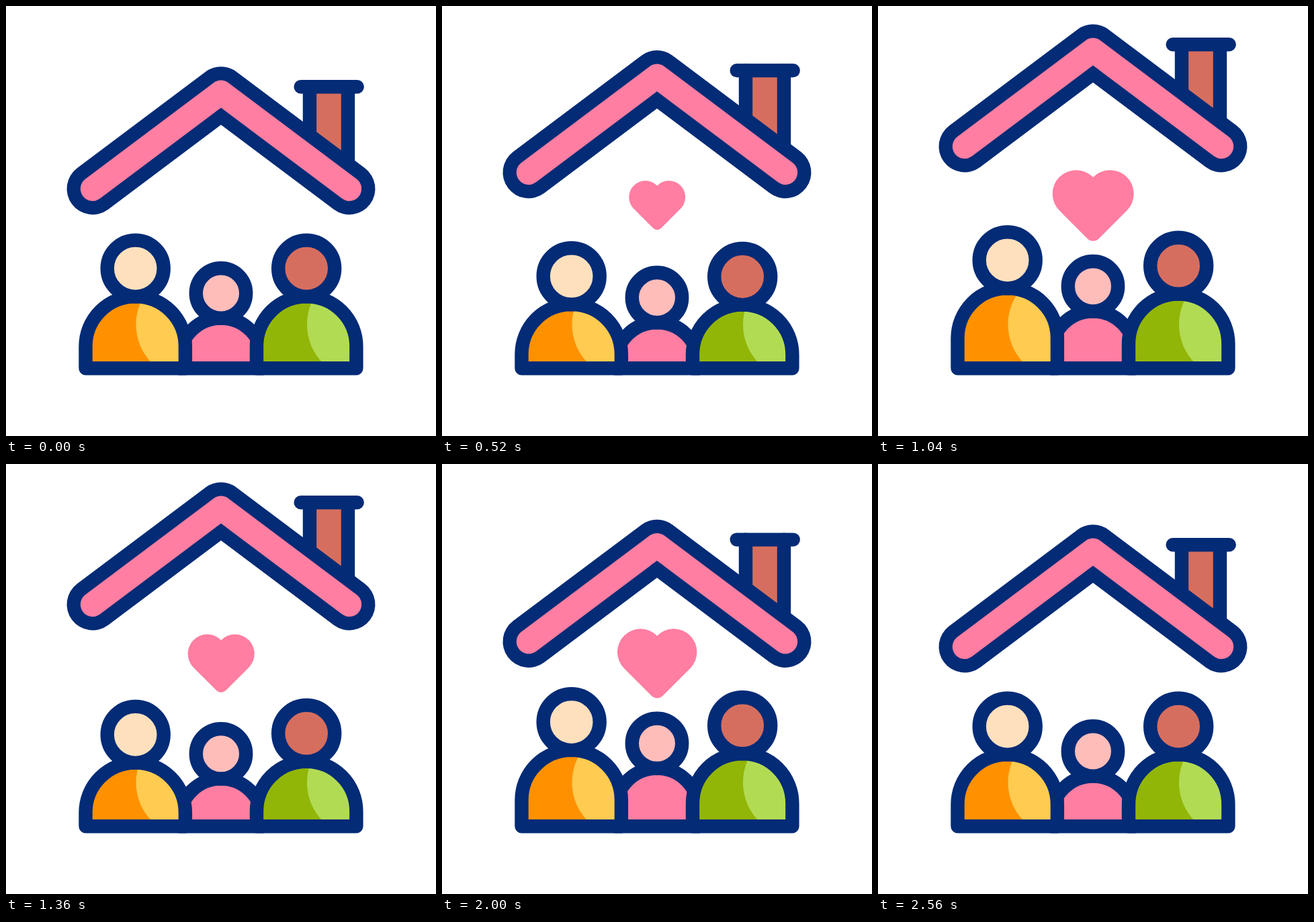
These frames come from a looping animation (640x640 px, 2640 ms). An HTML page with a canvas:

```html
<!DOCTYPE html>
<html lang="en">
<head>
<meta charset="utf-8">
<title>Family home</title>
<style>
  html, body { margin: 0; width: 100%; height: 100%; overflow: hidden; background: #fff; }
  canvas { display: block; width: 100vw; height: 100vh; }
</style>
</head>
<body>
<canvas id="stage" width="640" height="640"></canvas>
<script>
const ctx = document.getElementById('stage').getContext('2d');
const LOOP = 2640, STEP = 40, LINE = 20.4, BASE = 539.3;
const NAVY = '#032b76', PINK = '#ff7ea1', BRICK = '#d66e5f';

// Eased value through [time, value] keys, held outside their range.
function track(keys, t) {
  if (t <= keys[0][0]) return keys[0][1];
  for (let i = 1; i < keys.length; i++) {
    const [t0, v0] = keys[i - 1], [t1, v1] = keys[i];
    if (t < t1) {
      const x = (t - t0) / (t1 - t0);
      return v0 + (v1 - v0) * x * x * (3 - 2 * x);
    }
  }
  return keys[keys.length - 1][1];
}

const bounceKeys = start => [0, 13, -13, 13, -13, 0].map((y, i) => [start + i * 400, y]);

const roofKeys = [[220, 0], [930, -63], [1488, -63], [2142, 0]];
const heartSize = [[40, 102], [565, 83.5], [1070, 121.4], [1590, 83.5], [2085, 121.4], [2560, 102]];
const heartAlpha = [[80, 0], [380, 1], [2280, 1], [2560, 0]];

const people = [
  { x: 320, headY: 427.5, headR: 37.2, bodyY: 526.5, bodyR: 62, skin: '#ffbdba', cloth: PINK, bounce: bounceKeys(320) },
  { x: 192.7, headY: 390.6, headR: 42, bodyY: 506.6, bodyR: 74.2, skin: '#fee0bd', cloth: '#ff9100', light: '#ffcb50', bounce: bounceKeys(200) },
  { x: 447.2, headY: 390.6, headR: 42, bodyY: 506.6, bodyR: 74.2, skin: BRICK, cloth: '#92b607', light: '#b2db54', bounce: bounceKeys(80) }
];

function stroke(color, width) {
  ctx.strokeStyle = color;
  ctx.lineWidth = width;
  ctx.stroke();
}

function fill(color) {
  ctx.fillStyle = color;
  ctx.fill();
}

function circle(x, y, r) {
  ctx.beginPath();
  ctx.arc(x, y, r, 0, Math.PI * 2);
}

function line(...points) {
  ctx.beginPath();
  points.forEach(([x, y]) => ctx.lineTo(x, y));
}

function drawPerson(p, t) {
  const dy = track(p.bounce, t);
  const body = new Path2D();
  body.moveTo(p.x - p.bodyR, BASE);
  body.arc(p.x, p.bodyY + dy, p.bodyR, Math.PI, 0);
  body.lineTo(p.x + p.bodyR, BASE);
  body.closePath();

  ctx.fillStyle = p.cloth;
  ctx.fill(body);
  if (p.light) {
    ctx.save();
    ctx.clip(body);
    circle(p.x + 82.8, 474, 82);
    fill(p.light);
    ctx.restore();
  }
  ctx.strokeStyle = NAVY;
  ctx.lineWidth = LINE;
  ctx.stroke(body);

  circle(p.x, p.headY + dy, p.headR);
  fill(p.skin);
  stroke(NAVY, LINE);
}

function drawRoof(t) {
  ctx.save();
  ctx.translate(0, track(roofKeys, t));
  ctx.fillStyle = BRICK;
  ctx.fillRect(452, 120, 57, 120);
  line([452, 120.2], [452, 200]);
  stroke(NAVY, LINE);
  line([509, 120.2], [509, 240]);
  stroke(NAVY, LINE);
  line([438.7, 120.2], [522.7, 120.2]);
  stroke(NAVY, LINE);

  line([129, 272], [320, 128.8], [511, 272]);
  stroke(NAVY, 77);
  stroke(PINK, 36.4);
  circle(320, 164.2, LINE / 2);
  fill(NAVY);
  ctx.restore();
}

function drawHeart(t) {
  const scale = track(heartSize, t) / 121;
  const lobe = 35.3, cx = 25.2, cy = -16.5;
  const tip = cx + cy + lobe * Math.SQRT2;
  ctx.save();
  ctx.globalAlpha = track(heartAlpha, t);
  ctx.translate(320.2, 296);
  ctx.scale(scale, scale);
  ctx.beginPath();
  const cusp = Math.acos(cx / lobe);
  ctx.arc(-cx, cy, lobe, Math.PI * 0.75, Math.PI * 2 - cusp);
  ctx.arc(cx, cy, lobe, Math.PI + cusp, Math.PI * 2.25);
  ctx.arcTo(0, tip, -20, tip - 20, 12);
  ctx.closePath();
  fill(PINK);
  ctx.restore();
}

function draw(now) {
  const t = Math.floor((now % LOOP) / STEP) * STEP;
  ctx.fillStyle = '#fff';
  ctx.fillRect(0, 0, 640, 640);
  ctx.lineCap = ctx.lineJoin = 'round';
  drawRoof(t);
  drawHeart(t);
  people.forEach(p => drawPerson(p, t));
}

let start;
function tick(now) {
  start ??= now;
  draw(Math.max(0, now - start));
  requestAnimationFrame(tick);
}
draw(0);
requestAnimationFrame(tick);
</script>
</body>
</html>
```
